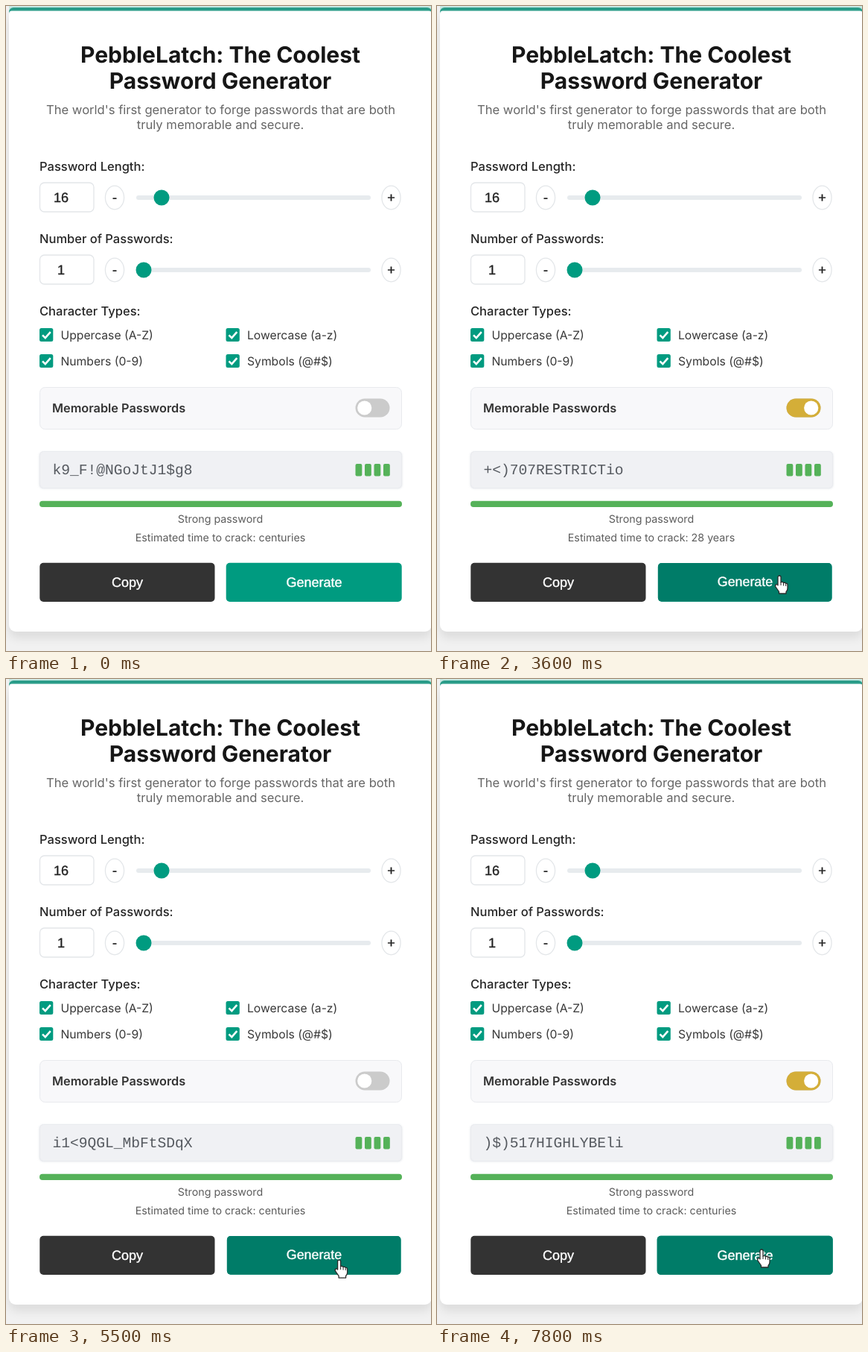
Animation, 571 px wide and 865 px high, one loop 8000 ms. Source, as an HTML page:

```html
<!DOCTYPE html>
<html lang="en">
<head>
<meta charset="utf-8">
<title>Password Generator</title>
<style>
  html, body { margin: 0; width: 100%; height: 100%; overflow: hidden; background: #f1f1f1; }
  svg { display: block; width: 571px; height: 865px; }
  #page { filter: blur(.45px); }
  text { font-family: Inter, sans-serif; text-rendering: geometricPrecision; white-space: pre; }
  .title { font-size: 30px; font-weight: 700; fill: #161616; }
  .sub { font-size: 16.6px; fill: #666; }
  .label { font-size: 16.5px; font-weight: 500; fill: #262626; }
  .strong { font-size: 16.3px; font-weight: 600; fill: #333; }
  .check { font-size: 15.7px; fill: #383838; }
  .note { font-size: 14.25px; fill: #5c5c5c; }
  .mid { text-anchor: middle; }
  .ui, .button { font: 18px "Liberation Sans", Arial, sans-serif; stroke-width: .4; }
  .ui { fill: #222; stroke: #222; }
  .button { fill: #fff; stroke: #fff; }
  .mono { font: 19.6px "Liberation Mono", "Courier New", monospace; fill: #55595f; }
  .box { fill: #fff; stroke: #e3e6e9; stroke-width: 1.3; }
  .teal { fill: #009b80; }
  .green { fill: #55b259; }
</style>
</head>
<body>
<svg id="stage" viewBox="0 0 571 865"></svg>
<script>
const stage = document.getElementById('stage');

const text = (cls, x, y, str, id = '') => `<text class="${cls}" x="${x}" y="${y}" id="${id}">${str}</text>`;
const rect = (x, y, w, h, r, attrs) => `<rect x="${x}" y="${y}" width="${w}" height="${h}" rx="${r}" ${attrs}/>`;

const stepButton = (x, y, sign) => `
  <ellipse class="box" cx="${x}" cy="${y}" rx="12.6" ry="15.8"/>
  ${text('ui mid', x, y + 6, sign)}`;

const slider = (y, label, value, knobX) => `
  ${text('label', 45, y - 36.5, label)}
  ${rect(45.5, y - 20, 72.5, 39, 6, 'class="box"')}
  ${text('ui mid', 74, y + 5.5, value)}
  ${stepButton(146, y, '-')}
  ${rect(175, y - 3, 315, 6, 3, 'fill="#e7ebee"')}
  <circle class="teal" cx="${knobX}" cy="${y}" r="10.5"/>
  ${stepButton(517.5, y, '+')}`;

const checkbox = (x, y, label) => `
  ${rect(x, y - 9, 18.3, 18, 2.5, 'class="teal"')}
  <path d="M${x + 4} ${y + .3}l3.8 3.8 7-8" fill="none" stroke="#fff" stroke-width="2.6"/>
  ${text('check', x + 28.5, y + 5.5, label)}`;

stage.innerHTML = `
  <defs><filter id="soft" x="-10%" y="-10%" width="120%" height="130%"><feGaussianBlur stdDeviation="7"/></filter>
  <filter id="halo"><feGaussianBlur stdDeviation="1.5"/></filter></defs>
  ${rect(0, 0, 571, 865, 0, 'fill="#f1f1f1"')}
  <g id="page">
  ${rect(4, 14, 568, 833, 10, 'fill="#000" opacity=".09" filter="url(#soft)"')}
  ${rect(4, -4, 568, 12, 0, 'fill="#c6e8e2"')}
  ${rect(4, 2, 568, 40, 6, 'fill="#2a9c89"')}
  ${rect(4, 6.5, 568, 100, 4, 'fill="#fff"')}
  ${rect(4, 20, 568, 819, 9, 'fill="#fff"')}
  ${text('title mid', 288, 75.5, 'PebbleLatch: The Coolest')}
  ${text('title mid', 288, 111, 'Password Generator')}
  ${text('sub mid', 288.5, 144.5, "The world's first generator to forge passwords that are both")}
  ${text('sub mid', 288, 164.5, 'truly memorable and secure.')}
  ${slider(257, 'Password Length:', '16', 209)}
  ${slider(354, 'Number of Passwords:', '1', 185)}
  ${text('label', 45, 415, 'Character Types:')}
  ${checkbox(45, 441, 'Uppercase (A-Z)')}
  ${checkbox(295.5, 441, 'Lowercase (a-z)')}
  ${checkbox(45, 476, 'Numbers (0-9)')}
  ${checkbox(295.5, 476, 'Symbols (@#$)')}
  ${rect(45.5, 511.5, 486, 56, 7, 'fill="#f8f8fa" stroke="#e8eaee"')}
  ${text('strong', 62, 545, 'Memorable Passwords')}
  ${rect(469.5, 526.5, 46, 25, 12.5, 'fill="#cbcbcb"')}
  ${rect(469.5, 526.5, 46, 25, 12.5, 'fill="#d4ae38" id="gold"')}
  <circle id="knob" cy="539" r="9.6" fill="#fff"/>
  ${rect(45, 598, 487, 49, 5, 'fill="#cfd3da" opacity=".7" filter="url(#halo)"')}
  ${rect(45.5, 597.5, 486, 49, 5, 'fill="#f0f1f4" stroke="#e9ebef"')}
  ${text('mono', 62.5, 628, '', 'password')}
  ${[0, 1, 2, 3].map(i => rect(469.5 + i * 12.5, 614, 8.8, 16.5, 2, 'class="green"')).join('')}
  ${rect(45, 663.7, 487, 8.3, 4, 'class="green"')}
  ${text('note mid', 288, 693, 'Strong password')}
  ${text('note mid', 288, 718, '', 'estimate')}
  ${rect(45.3, 746.7, 235.2, 52.3, 5, 'fill="#333"')}
  ${text('button mid', 163, 778.5, 'Copy')}
  <g id="generate">
    ${rect(295.7, 746.7, 236, 52.3, 5, 'class="teal"')}
    ${rect(295.7, 746.7, 236, 52.3, 5, 'fill="#007c68" id="hover"')}
    ${text('button mid', 414, 778.5, 'Generate')}
  </g>
  <g id="cursor" fill="#fff" stroke="#2b2b2b" stroke-width="1.3" stroke-linejoin="round">
    <path id="arrow" d="M0 0V16.5l3.7-3.3 2.7 6.6 2.7-1.1-2.7-6.4H11z"/>
    <g id="hand">
      <path d="M-2 2a2 2 0 0 1 4 0V9q2-1.5 3.5.6 2-1 3.2.8 2.3-.6 2.3 2V17q0 3-2 4.5V24H-.5V21.5L-5 15q-1-2 .5-3t2.5 1Z"/>
      <path d="M2 9v4M5.5 10v3.5M8.7 11v3" stroke-width="1"/>
    </g>
  </g>
  </g>`;

const el = Object.fromEntries([...stage.querySelectorAll('[id]')].filter(n => n.id).map(n => [n.id, n]));

const LOOP = 8000, STEP = 100;
const CENTURIES = 'centuries';

// time, password, time to crack
const passwords = [
  [0, 'k9_F!@NGoJtJ1$g8', CENTURIES],
  [3500, '+&lt;)707RESTRICTio'.replace('&lt;', '<'), '28 years'],
  [4800, '8MpH$Ef)1XPD69JK', CENTURIES],
  [5400, 'i1<9QGL_MbFtSDqX', CENTURIES],
  [7500, ')$)517HIGHLYBEli', CENTURIES]
];
const toggles = [[0, 0], [2000, 1], [4400, 0], [6600, 1]];

// time, x, y of the pointer tip
const path = [
  [800, 527, 735], [1000, 480, 775], [1200, 457, 779], [1400, 460, 778],
  [1900, 490, 541], [2200, 490, 541], [2500, 469, 754], [2800, 459, 765],
  [3100, 460, 764], [3700, 460, 764], [4200, 490, 541], [4500, 489, 541],
  [4800, 444, 780], [5000, 443, 797], [5200, 446, 785], [5900, 450, 770],
  [6000, 456, 690], [6400, 490, 541], [6800, 490, 541], [7300, 440, 766],
  [7600, 436, 765], [LOOP, 436, 765]
];

const clamp = v => Math.min(1, Math.max(0, v));
const latest = (table, t) => table.findLastIndex(row => row[0] <= t);

function pointer(t) {
  const i = latest(path, t);
  if (i < 0) return null;
  const [t0, x0, y0] = path[i];
  const [t1, x1, y1] = path[Math.min(i + 1, path.length - 1)];
  const p = clamp((t - t0) / (t1 - t0 || 1));
  const k = p * p * (3 - 2 * p);
  return { x: x0 + (x1 - x0) * k, y: y0 + (y1 - y0) * k };
}

const within = (p, x, y, w, h) => !!p && p.x >= x && p.x <= x + w && p.y >= y && p.y <= y + h;
const onGenerate = t => within(pointer(t), 296, 747, 236, 52);
const onToggle = t => within(pointer(t), 469, 526, 46, 25);

function draw(t) {
  const [clicked, password, estimate] = passwords[latest(passwords, t)];
  el.password.textContent = password;
  el.estimate.textContent = 'Estimated time to crack: ' + estimate;

  const i = latest(toggles, t);
  const ramp = clamp((t - toggles[i][0]) / 300);
  const on = toggles[i][1] ? ramp : i ? 1 - ramp : 0;
  el.gold.setAttribute('opacity', on);
  el.knob.setAttribute('cx', 481.7 + 21 * on);

  el.hover.setAttribute('opacity', (onGenerate(t - STEP) + onGenerate(t - 2 * STEP)) / 2);
  const press = clicked ? 1 - clamp((t - clicked) / 200) : 0;
  el.generate.setAttribute('transform', `translate(414 778) scale(${1 - .02 * press}) translate(-414 -778)`);

  const p = pointer(t);
  el.cursor.style.display = p ? '' : 'none';
  if (!p) return;
  const hand = onGenerate(t) || onToggle(t);
  el.cursor.setAttribute('transform', `translate(${p.x} ${p.y})`);
  el.hand.style.display = hand ? '' : 'none';
  el.arrow.style.display = hand ? 'none' : '';
}

const start = performance.now();
function tick() {
  const t = (performance.now() - start) % LOOP;
  draw(Math.floor(t / STEP) * STEP);
  requestAnimationFrame(tick);
}
tick();
</script>
</body>
</html>
```
